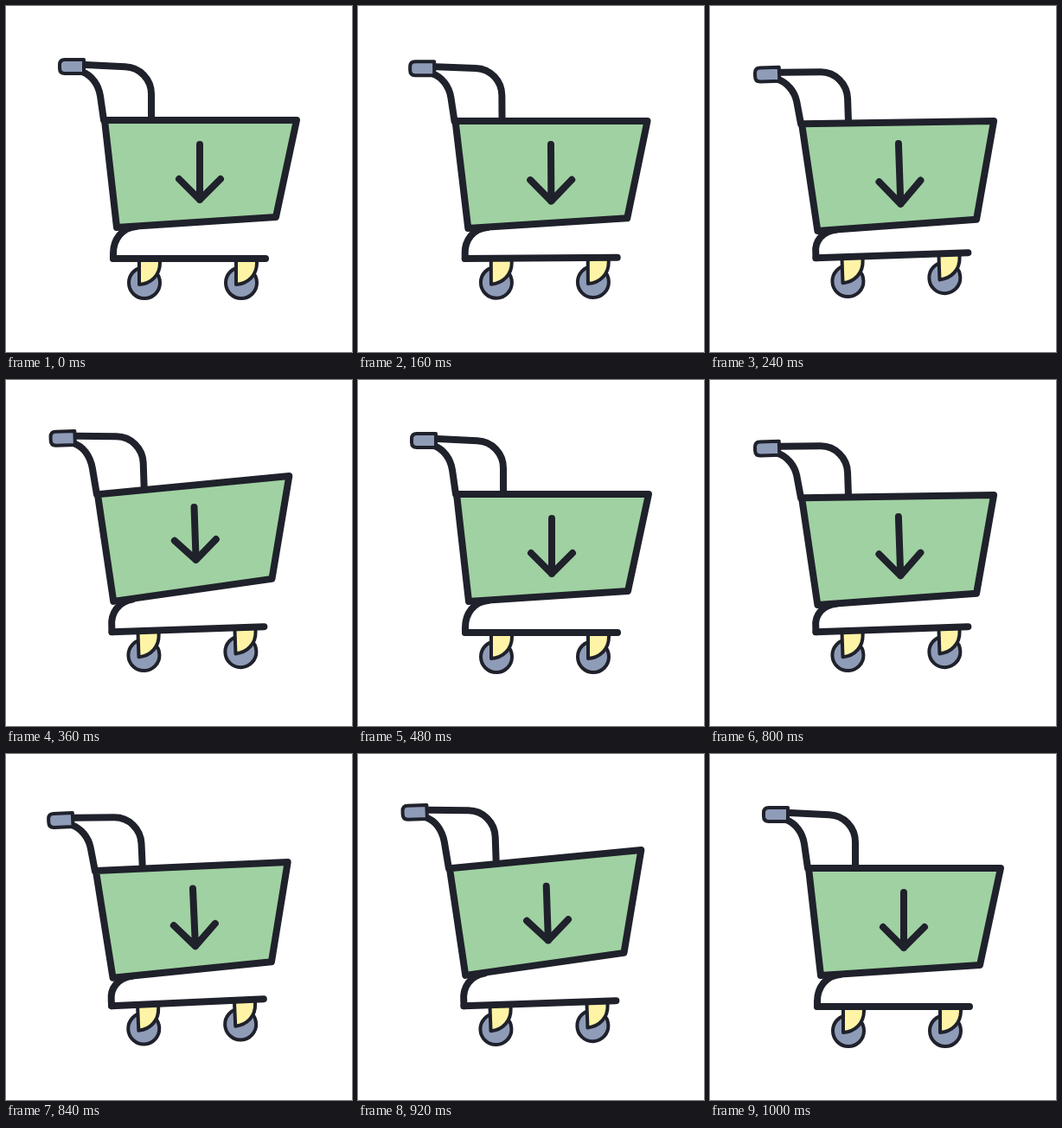
An HTML page for the animation above (1120 ms loop, 400 px wide and 400 px high).

```html
<!DOCTYPE html>
<html lang="en">
<head>
<meta charset="utf-8">
<title>Shopping cart</title>
<style>
  html, body { margin: 0; width: 100%; height: 100%; overflow: hidden; background: #fff; }
  svg { display: block; width: 100vw; height: 100vh; }
</style>
</head>
<body>
<svg viewBox="0 0 400 400" fill="none" stroke="#1f212b" stroke-width="8" stroke-linecap="round" stroke-linejoin="round">
  <defs>
    <g id="wheel" stroke-width="4">
      <circle cx="160" cy="320" r="18" fill="#8f9cb8"/>
      <path d="M154 292V322C168 321 178 311 178 297V292Z" fill="#fff4a6"/>
    </g>
  </defs>
  <g id="cart">
    <use href="#wheel"/>
    <use href="#wheel" x="112"/>
    <path d="M124 292H300"/>
    <path id="leg"/>
    <path id="handle"/>
    <path id="basket" fill="#a0d1a2"/>
    <path id="grip" fill="#8f9cb8" stroke-width="4"/>
    <path id="arrow"/>
  </g>
</svg>
<script>
const LOOP = 1120, STEP = 40, HALF = 560;
const el = id => document.getElementById(id);
const setPath = (id, d) => el(id).setAttribute('d', d);

function smooth(x) {
  x = Math.max(0, Math.min(1, x));
  return x * x * (3 - 2 * x);
}
// Eased hump: 1 at the centre, 0 beyond the given reach
const hump = (u, centre, reach) => smooth(1 - Math.abs(u - centre) / reach);

function draw(ms) {
  const t = Math.floor(ms % LOOP / STEP) * STEP;
  const second = t >= HALF;
  let u = t % HALF - 120;
  if (second && u > 240) u = 240 + (u - 240) * 1.5; // quicker settling

  const tilt = -2.7 * hump(u, 180, 180);
  const sink = hump(u, 120, 120);
  const lift = hump(u, 240, 120);

  // Point displaced by its own sink and lift distances
  const body = (x, y, a, b) => `${x - sink - lift} ${y + a * sink + b * lift} `;
  const mark = (x, y, a, b) =>
    `${x} ${y + a * sink * (second ? 0.7 : 1) + b * lift * (second ? 0.36 : 1)} `;
  const top = (x, y) => body(x, y, 8, -3.8);
  const bend = (x, y) => body(x, y, 7, -4);

  el('cart').setAttribute('transform', `rotate(${tilt} 105 335)`);

  setPath('leg', 'M124 292V286C' + body(124, 270, 2, 0) + body(134, 256.5, 4.7, 0.5) + body(150, 255, 5, 0));

  setPath('handle',
    'M' + top(92, 68) + 'L' + bend(138, 70.3) +
    'C' + bend(155, 71) + bend(168, 85) + bend(168, 102) +
    'L' + body(168, 132, 5.5, -3) +
    'M' + top(88, 76) + 'C' + top(99, 80) + top(107, 91) + body(109, 104, 6, -2) +
    'L' + body(113, 132, 4.3, 0.3));

  setPath('basket',
    'M' + body(114, 132, 4.3, 0.3) + 'L' + body(336, 132, 9, -13) +
    body(312, 244, 10, -7) + body(128, 256, 4.7, 0.6) + 'Z');

  setPath('grip', 'M' + top(90, 62) + 'v16h-22q-6 0-6-6v-4q0-6 6-6Z');

  setPath('arrow',
    'M' + mark(224, 160, 3, -9) + 'L' + mark(224, 224, 9, -12) +
    'M' + mark(200, 200, 6.5, -11) + 'L' + mark(224, 224, 9, -12) + mark(248, 200, 6.5, -11));
}

const start = performance.now();
function tick() {
  draw(performance.now() - start);
  requestAnimationFrame(tick);
}
tick();
</script>
</body>
</html>
```
